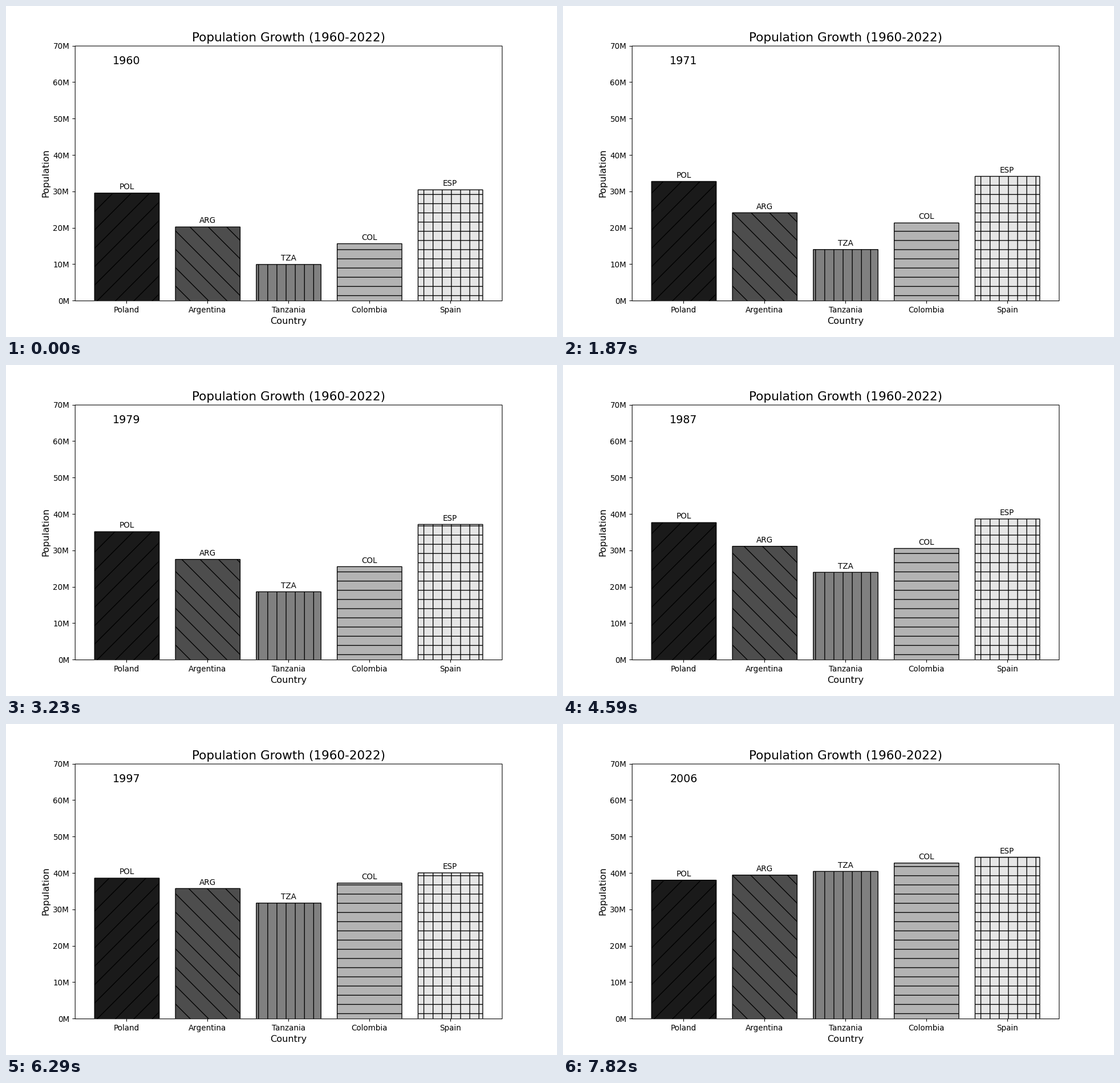
Recreate the animation shown at these times as a matplotlib script. Size 966x580 px, loop 7.99 s.

```python
import numpy as np
import matplotlib.pyplot as plt
from matplotlib.animation import FuncAnimation
from matplotlib.collections import LineCollection
from matplotlib.patches import Rectangle
from matplotlib.transforms import ScaledTranslation

W, H, DPI = 966, 580, 97
FIRST, LAST = 1960, 2006
GRID_W, GRID_H, CELL = 1000, 600, 100 / 6  # layout units for the hatching

# Population in millions in a few key years
KEY_YEARS = [1960, 1971, 1979, 1987, 1997, 2000, 2006]
COUNTRIES = [
    ("Poland", "POL", "0.1", "/", [29.6, 32.8, 35.2, 37.7, 38.65, 38.3, 38.1]),
    ("Argentina", "ARG", "0.3", "\\", [20.3, 24.2, 27.6, 31.2, 35.8, 37.1, 39.5]),
    ("Tanzania", "TZA", "0.5", "|", [10.0, 14.1, 18.7, 24.05, 31.8, 34.5, 40.5]),
    ("Colombia", "COL", "0.7", "-", [15.7, 21.4, 25.6, 30.6, 37.3, 39.2, 42.8]),
    ("Spain", "ESP", "0.9", "+", [30.5, 34.2, 37.2, 38.7, 40.1, 40.6, 44.4]),
]


def smooth(year, values):
    """Cubic Hermite curve through the key years."""
    slopes = np.gradient(values, KEY_YEARS, edge_order=2)
    i = min(np.searchsorted(KEY_YEARS, year, side="right"), len(KEY_YEARS) - 1) - 1
    span = KEY_YEARS[i + 1] - KEY_YEARS[i]
    t = (year - KEY_YEARS[i]) / span
    ease = t * t * (3 - 2 * t)
    return (values[i] + (values[i + 1] - values[i]) * ease
            + span * t * (1 - t) * ((1 - t) * slopes[i] - t * slopes[i + 1]))


def hatch_lines(kind):
    """Segments covering the stage, in figure fractions."""
    segs = []
    if kind in "|+":
        segs += [[(x, 0), (x, GRID_H)] for x in np.arange(CELL / 2, GRID_W, CELL)]
    if kind in "-+":
        segs += [[(0, y), (GRID_W, y)] for y in np.arange(CELL / 2, GRID_H, CELL)]
    if kind in "/\\":
        lean = -GRID_H if kind == "/" else GRID_H
        segs += [[(x, 0), (x + lean, GRID_H)]
                 for x in np.arange(-48, 49) * 2 * CELL]
    return [[(x / GRID_W, 1 - y / GRID_H) for x, y in s] for s in segs]


plt.rcParams["font.family"] = "DejaVu Sans"
# The tiny surplus keeps the pixel size from rounding down
fig = plt.figure(figsize=((W + 0.001) / DPI, (H + 0.001) / DPI), dpi=DPI)
ax = fig.add_axes([0.125, 0.11, 0.775, 0.77])
ax.set_xlim(-0.64, 4.64)
ax.set_ylim(0, 70)

# Outlines sit half a pixel right of and below the exact position
nudge = ScaledTranslation(0.483 / DPI, -0.483 / DPI, fig.dpi_scale_trans)
ax.spines[:].set_visible(False)
ax.add_patch(Rectangle((0, 0), 1, 1, fill=False, linewidth=0.8, zorder=2.5,
                       transform=ax.transAxes + nudge, clip_on=False, snap=False))

bars, hatches, labels = [], [], []
for i, (_, code, gray, kind, _) in enumerate(COUNTRIES):
    bar = Rectangle((i - 0.4, 0), 0.8, 0, facecolor=gray, edgecolor="black",
                    linewidth=1, transform=ax.transData + nudge, snap=False)
    bars.append(ax.add_patch(bar))
    lines = LineCollection(hatch_lines(kind), colors="black", linewidths=1,
                           transform=fig.transFigure, zorder=1.5)
    lines.set_snap(False)
    hatches.append(ax.add_collection(lines, autolim=False))
    labels.append(ax.text(i, 0, code, ha="center", va="bottom", fontsize=10.04))
year_text = ax.text(0, 65, "", ha="center", fontsize=14.1)

ax.set_xticks(range(len(COUNTRIES)), [c[0] for c in COUNTRIES])
ax.set_yticks(range(0, 71, 10))
ax.yaxis.set_major_formatter(lambda v, _: f"{v:.0f}M")
ax.tick_params(labelsize=10.04)
ax.set_title("Population Growth (1960-2022)", fontsize=15.94)
ax.set_xlabel("Country", fontsize=11.95)
ax.set_ylabel("Population", fontsize=11.95)


def update(frame):
    year = FIRST + frame
    year_text.set_text(str(year))
    for bar, lines, label, country in zip(bars, hatches, labels, COUNTRIES):
        value = smooth(year, country[4])
        bar.set_height(value)
        lines.set_clip_path(bar)
        label.set_y(value + 0.5)
    return [*bars, *hatches, *labels, year_text]


anim = FuncAnimation(fig, update, frames=LAST - FIRST + 1, interval=170,
                     repeat=True, blit=False)
plt.show()
```
